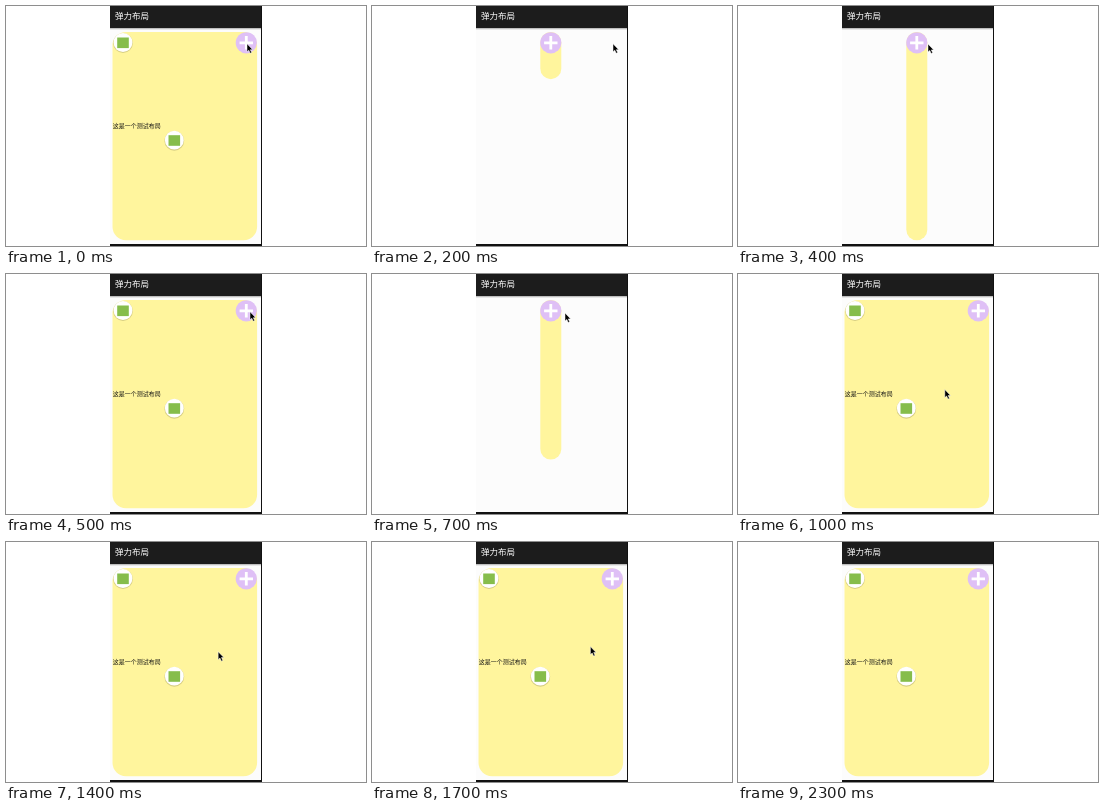
An HTML page for the animation above (2.4 s loop, 360 px wide and 240 px high).

```html
<!DOCTYPE html>
<html lang="zh-CN">
<head>
<meta charset="utf-8">
<style>
html, body { margin: 0; width: 100%; height: 100%; overflow: hidden; background: #fff; }
svg { display: block; }
text { font-family: "Noto Sans CJK SC", "Noto Sans CJK", sans-serif; }
</style>
</head>
<body>
<svg width="360" height="240" viewBox="0 0 360 240">
  <defs>
    <linearGradient id="shade" x2="0" y2="1">
      <stop offset="0" stop-color="#aaa"/>
      <stop offset="1" stop-color="#fcfcfc"/>
    </linearGradient>
    <g id="icon">
      <circle cy=".6" r="9.9" fill="#000" opacity=".16"/>
      <circle r="9.4" fill="#fff"/>
      <rect x="-5.8" y="-5" width="11.6" height="10.6" fill="#86bd4b"/>
    </g>
  </defs>
  <rect x="104" width="152" height="240" fill="#fcfcfc"/>
  <rect x="104" y="22" width="152" height="2" fill="url(#shade)"/>
  <rect x="104" width="152" height="22" fill="#1c1c1c"/>
  <rect x="255" width="1" height="240" fill="#111"/>
  <rect x="104" y="238" width="152" height="2" fill="#111"/>
  <text x="109" y="13.3" font-size="8.5" fill="#fff">弹力布局</text>

  <rect id="panel" y="25.9" fill="#fff59d"/>
  <g id="content">
    <use href="#icon" x="117" y="36.5"/>
    <use href="#icon" x="168.3" y="134.2"/>
    <text x="106.8" y="122.3" font-size="6" fill="#111">这是一个测试布局</text>
  </g>
  <g id="button">
    <circle r="10.6" fill="#dfc0f6"/>
    <path d="M-6.7 0H6.7M0-6.7V6.7" stroke="#fff" stroke-width="2.8"/>
  </g>
  <path id="cursor" d="M0 0V8L1.8 6.4 3.2 9.5 4.7 8.8 3.3 5.9H5.7Z" fill="#000" stroke="#fff" stroke-width=".5"/>
</svg>
<script>
const LOOP = 2400, STEP = 100, SMALL = 21, WIDE = 144.6, TALL = 208.4, MID = 178.8, ROUND = 13.5;
const $ = id => document.getElementById(id);
const panel = $('panel'), content = $('content'), button = $('button'), cursor = $('cursor');
const clamp = v => Math.max(0, Math.min(1, v));
const mix = (a, b, p) => a + (b - a) * p;

// Each cycle folds width then height, and unfolds in reverse order.
const FOLD = 100;
const cycles = [{ close: 14, open: 300 }, { close: 574, open: 800 }];

// Pointer path: time, x, y
const path = [
  [0, 241, 37.8], [200, 241, 37.8], [300, 183, 38], [400, 190, 38], [500, 244, 37.8],
  [600, 241, 38], [700, 193, 39], [800, 183, 39], [1000, 206.8, 115.6], [1100, 208, 113],
  [1200, 208, 113], [1700, 218.4, 104.6], [1900, 219, 102], [2000, 219, 102],
  [2200, 230, 1], [2300, 230, 1]
];

function size(t) {
  const { close, open } = cycles.findLast(c => t >= c.close) || { close: t, open: LOOP };
  const part = from => clamp((t - from) / FOLD);
  return t < open
    ? [1 - part(close), 1 - part(close + FOLD)]
    : [part(open + FOLD), part(open)];
}

function pointer(t) {
  const i = Math.max(1, path.findIndex(k => k[0] >= t));
  const [t0, x0, y0] = path[i - 1], [t1, x1, y1] = path[i];
  const p = (t - t0) / (t1 - t0);
  return [mix(x0, x1, p), mix(y0, y1, p)];
}

function set(el, attrs) {
  for (const name in attrs) el.setAttribute(name, attrs[name]);
}

function place(el, x, y) {
  set(el, { transform: `translate(${x} ${y})` });
}

function draw(now) {
  const t = Math.floor(now % LOOP / STEP) * STEP;
  const [w, h] = size(t);
  const width = mix(SMALL, WIDE, w), height = mix(SMALL, TALL, h);
  set(panel, { x: MID - width / 2, width, height, rx: Math.min(ROUND, width / 2, height / 2) });
  content.style.display = w === 1 ? '' : 'none';
  place(button, MID + (width - SMALL) / 2 - .3 * w, 36.8);
  cursor.style.display = t < 2300 ? '' : 'none';
  place(cursor, ...pointer(t));
}

const start = performance.now();
function tick() {
  draw(performance.now() - start);
  requestAnimationFrame(tick);
}
tick();
</script>
</body>
</html>
```
